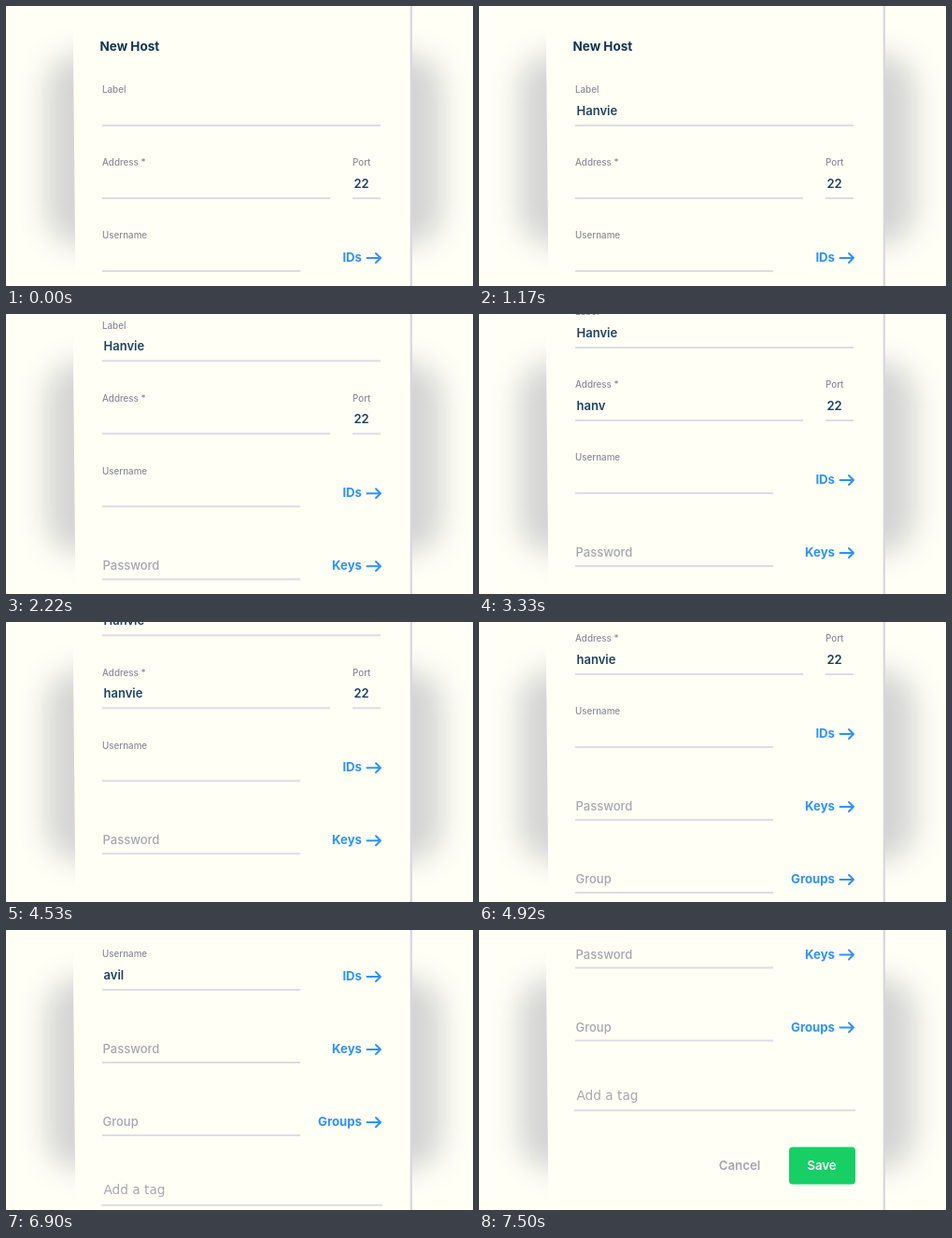
Write an HTML page that moves like this. It is 500 px wide and 300 px high and loops after 8000 ms.

```html
<!DOCTYPE html>
<html lang="en">
<head>
<meta charset="utf-8">
<title>New Host form</title>
<style>
  html, body { margin: 0; width: 100%; height: 100%; overflow: hidden; background: #fffff6; }
  #shadow { position: absolute; left: 43px; top: 51px; width: 424px; height: 206px;
    border-radius: 38px; background: rgba(0, 0, 48, .17); filter: blur(15px); }
  svg { position: absolute; left: 0; top: 0; }
  text { font: 500 13px Inter, sans-serif; white-space: pre; }
  .title { font-weight: 700; font-size: 13.5px; fill: #12344f; }
  .label { font-size: 9.8px; fill: #8b8b95; }
  .value { font-weight: 600; fill: #1f425f; }
  .hint { fill: #a6a6ae; }
  .tag { font: 13.7px "DejaVu Sans", sans-serif; }
  .link { font-weight: 700; font-size: 13.2px; fill: #2f92f8; text-anchor: end; }
  .button { font-weight: 600; font-size: 13.3px; text-anchor: middle; }
  .arrow { fill: none; stroke: #2f92f8; stroke-width: 2; stroke-linecap: round; stroke-linejoin: round; }
</style>
</head>
<body>
<div id="shadow"></div>
<svg width="500" height="300" viewBox="0 0 500 300">
  <path d="M71.5 0H434V300H74.5Z" fill="#fffff6"/>
  <path d="M433.8 0V300" stroke="#d7d7df" stroke-width="2.2"/>
  <g id="form"></g>
  <circle id="tap" fill="#6f7f90"/>
</svg>
<script>
const LOOP = 8000;
const form = document.getElementById('form');
const tap = document.getElementById('tap');

function add(name, attributes, content = '') {
  const node = document.createElementNS('http://www.w3.org/2000/svg', name);
  for (const key in attributes) node.setAttribute(key, attributes[key]);
  node.textContent = content;
  return form.appendChild(node);
}
const text = (style, x, y, content) => add('text', { class: style, x, y }, content);
const rule = (x1, x2, y) => add('path', { d: `M${x1} ${y}H${x2}`, stroke: '#dddde3', 'stroke-width': 2 });

function link(y, content) {
  text('link', 381, y, content);
  add('path', { class: 'arrow', d: `M386.5 ${y - 4}h14.5m-5-5l5 5l-5 5` });
}

text('title', 100.5, 48, 'New Host');
text('label', 103, 93.3, 'Label');
rule(103, 401, 128);
text('label', 103, 171.3, 'Address *');
rule(103, 347, 206);
text('label', 371, 171.3, 'Port');
text('value', 372.5, 195, '22');
rule(371, 401, 206);
text('label', 103, 249.3, 'Username');
rule(103, 315, 284);
link(274, 'IDs');
text('hint', 103.5, 352, 'Password');
rule(103, 315, 362);
link(352, 'Keys');
text('hint', 103.5, 430, 'Group');
rule(103, 315, 440);
link(430, 'Groups');
text('hint tag', 104.5, 503, 'Add a tag');
rule(102, 403, 514.7);
text('button', 279, 578, 'Cancel').setAttribute('fill', '#a4a4b0');
add('rect', { x: 332, y: 554, width: 71, height: 40, rx: 4, fill: '#17cf65' });
text('button', 367, 578, 'Save').setAttribute('fill', '#fff');

// Each typed field lists the moment every letter appears.
const fields = [
  { y: 117, content: 'Hanvie', times: [570, 690, 810, 930, 1050, 1170] },
  { y: 195, content: 'hanvie', times: [2940, 3090, 3210, 3330, 3510, 3660] },
  { y: 273, content: 'avil', times: [5670, 5820, 6030, 6210] }
].map(field => ({ ...field, node: text('value', 104.5, field.y, '') }));

const scrolls = [
  { start: 1620, end: 2430, from: 0, to: 92 },
  { start: 4207, end: 4987, from: 92, to: 151 },
  { start: 6427, end: 7507, from: 151, to: 321.5 }
];
const taps = [
  { start: 90, end: 420, x: 120.5, y: 115.5 },
  { start: 2460, end: 2910, x: 120, y: 100 },
  { start: 5070, end: 5520, x: 124.5, y: 119.5 }
];

const progress = (t, { start, end }) => Math.min(1, Math.max(0, (t - start) / (end - start)));
const ease = p => (1 - Math.cos(Math.PI * p)) / 2;

function draw(t) {
  const offset = scrolls.reduce((sum, s) => sum + (s.to - s.from) * ease(progress(t, s)), 0);
  form.setAttribute('transform', `translate(0 ${-offset})`);

  for (const { node, content, times } of fields) {
    node.textContent = content.slice(0, times.filter(time => t >= time).length);
  }

  const active = taps.find(({ start, end }) => t >= start && t < end);
  tap.setAttribute('opacity', active ? .25 * (1 - progress(t, active)) : 0);
  if (active) {
    tap.setAttribute('cx', active.x);
    tap.setAttribute('cy', active.y);
    tap.setAttribute('r', 6 + 18.5 * progress(t, active));
  }
}

function tick() {
  draw(performance.now() % LOOP);
  requestAnimationFrame(tick);
}
tick();
</script>
</body>
</html>
```
